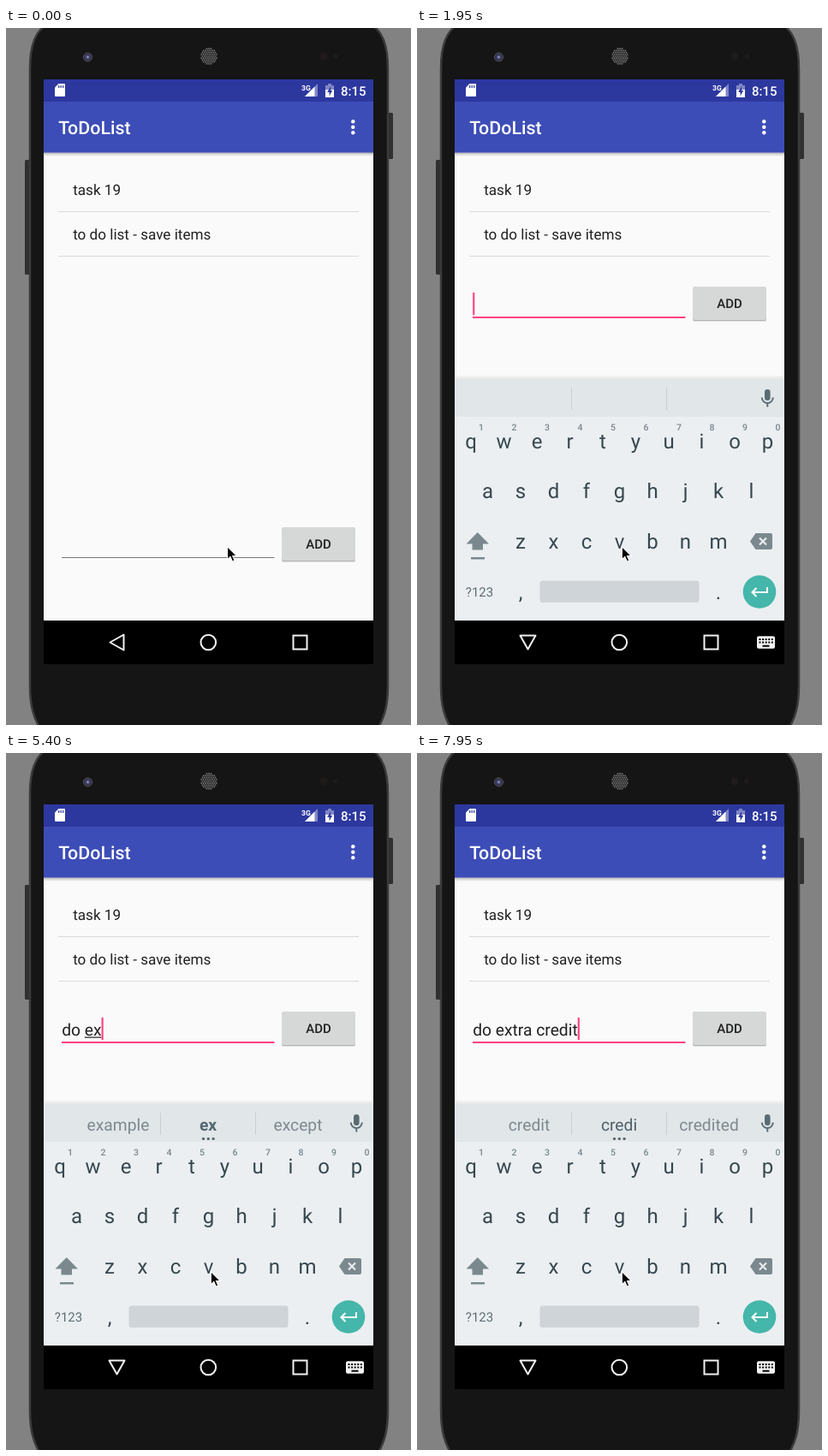
These frames come from a looping animation (473x814 px, 8000 ms). An HTML page:

```html
<!DOCTYPE html>
<html lang="en">
<head>
<meta charset="utf-8">
<title>To-do list demo</title>
<style>
  html, body { margin: 0; width: 100%; height: 100%; overflow: hidden; background: #828282; }
  svg { display: block; width: 473px; height: 814px; }
  text { font-family: Roboto, sans-serif; white-space: pre; text-rendering: geometricPrecision; }
  .medium { font-weight: 500; }
  .mid { text-anchor: middle; }
  .item { font-size: 17.1px; fill: #212121; }
  .letter { font-size: 24px; fill: #37474f; }
  .digit { font-size: 10.5px; font-weight: 500; fill: #78868d; }
  .word { font-size: 19.25px; fill: #7d898f; }
  .outline { fill: none; stroke: #f2f2f2; stroke-width: 2; }
</style>
</head>
<body>
<svg viewBox="0 0 473 814">
  <defs>
    <clipPath id="app"><rect x="44" y="86" width="385" height="606"/></clipPath>
    <linearGradient id="shade" x2="0" y2="1">
      <stop stop-color="#000" stop-opacity=".28"/><stop offset="1" stop-color="#000" stop-opacity="0"/>
    </linearGradient>
    <radialGradient id="lens">
      <stop stop-color="#b9b9e0"/><stop offset=".35" stop-color="#4a4a78"/><stop offset="1" stop-color="#20202c"/>
    </radialGradient>
  </defs>

  <!-- Phone body -->
  <rect width="473" height="814" fill="#828282"/>
  <rect x="22" y="154" width="6" height="134" rx="1.5" fill="#303030"/>
  <rect x="446" y="99" width="6" height="54" rx="1.5" fill="#303030"/>
  <path d="M50 -6C34 3 28 20 28 48V768C28 792 32 806 42 822H432C442 806 446 792 446 768V48C446 20 440 3 424 -6Z"
        fill="#151515" stroke="#3b3b3b" stroke-width="2.5"/>
  <circle cx="95.5" cy="34" r="5" fill="url(#lens)" stroke="#55555c"/>
  <g id="speaker"><circle cx="237" cy="33" r="10" fill="#242424"/></g>
  <circle cx="371" cy="33" r="4.5" fill="#1f1b1b"/>
  <circle cx="385" cy="33" r="2.8" fill="#1f1b1b"/>

  <!-- Screen -->
  <rect x="44" y="60" width="385" height="683" fill="#fafafa"/>
  <rect x="44" y="145" width="385" height="5" fill="url(#shade)"/>
  <rect x="44" y="60" width="385" height="26" fill="#2d389f"/>
  <rect x="44" y="86" width="385" height="59.5" fill="#3d4db7"/>
  <path d="M61.5 65H68Q69 65 69 66V79Q69 80 68 80H58Q57 80 57 79V69.5Z" fill="#fff"/>
  <path d="M61.7 67V70M64.2 67V70M66.7 67V70" stroke="#2d389f" stroke-width="1.2"/>
  <path d="M364 65V80H349Z" fill="#fff" opacity=".4"/>
  <path d="M360.5 68.5V80H349Z" fill="#fff"/>
  <text x="345" y="72.5" font-size="8.5" font-weight="700" fill="#fff">3G</text>
  <path d="M376 65H380V67H383V81H373V67H376Z" fill="#fff" opacity=".4"/>
  <path d="M373 72H383V81H373Z" fill="#fff"/>
  <path d="M379.2 68L375.2 75H377.6V79.5L381.2 73H379.2Z" fill="#2d389f"/>
  <text class="medium" x="391" y="78.7" font-size="15" fill="#fff">8:15</text>
  <text class="medium" x="61.3" y="124" font-size="21.4" fill="#fff">ToDoList</text>
  <g fill="#fff">
    <circle cx="405.3" cy="109.3" r="2.2"/><circle cx="405.3" cy="115.8" r="2.2"/><circle cx="405.3" cy="122.3" r="2.2"/>
  </g>
  <text class="item" x="78.2" y="194.5">task 19</text>
  <text class="item" x="78.2" y="247">to do list - save items</text>
  <path d="M61 214.5H412M61 266.5H412" stroke="#dadada"/>

  <!-- Entry row, placed as it stands above the keyboard -->
  <g id="entry">
    <rect x="322" y="304" width="86" height="39" rx="2" fill="#000" opacity=".1"/>
    <rect x="322" y="303" width="86" height="39" rx="2" fill="#000" opacity=".2"/>
    <rect x="322" y="302" width="86" height="39" rx="2" fill="#d6d7d7"/>
    <text class="medium mid" x="365" y="327" font-size="15" fill="#212121">ADD</text>
    <path id="line" d="M65 337.5H313.5"/>
    <text id="typed" x="65.2" y="330" font-size="19.25" fill="#212121"></text>
    <rect id="underline" y="331.5" height="1.2" fill="#212121"/>
    <rect id="caret" y="309" width="2.1" height="26" fill="#ff4081"/>
  </g>

  <!-- Keyboard -->
  <g clip-path="url(#app)">
    <g id="keyboard">
      <rect x="44" y="406" width="385" height="4" fill="#000" opacity=".03"/>
      <rect x="44" y="408" width="385" height="2" fill="#000" opacity=".04"/>
      <rect x="44" y="410" width="385" height="44" fill="#e1e6e9"/>
      <rect x="44" y="454" width="385" height="262" fill="#ebeff2"/>
      <path d="M180.5 420V446M291.5 420V446" stroke="#c8cfd3"/>
      <rect x="406" y="422" width="6.6" height="13" rx="3.3" fill="#5b6b73"/>
      <path d="M402.8 431.5A6.5 6.5 0 0 0 415.8 431.5M409.3 438V442.5" fill="none" stroke="#5b6b73" stroke-width="2"/>
      <g id="words">
        <text class="word mid" x="131" y="441"></text>
        <text class="word mid" x="236" y="441"></text>
        <text class="word mid" x="341" y="441"></text>
      </g>
      <g id="dots" fill="#4a5a62">
        <circle cx="230.5" cy="450.5" r="1.6"/><circle cx="236.3" cy="450.5" r="1.6"/><circle cx="242.1" cy="450.5" r="1.6"/>
      </g>
      <g id="keys"></g>
      <path d="M70.8 589L84 602.5H77V609.5H64.5V602.5H57.5ZM63 618H79V620.5H63Z" fill="#7b898f"/>
      <path d="M389 599.5L395.5 590H413Q415 590 415 592V607Q415 609 413 609H395.5Z" fill="#7b898f"/>
      <path d="M400 595.5L408 603.5M408 595.5L400 603.5" stroke="#ebeff2" stroke-width="2"/>
      <text class="mid" x="73" y="664" font-size="15" fill="#5f6d75">?123</text>
      <rect x="143.5" y="645.5" width="186" height="25.5" rx="3" fill="#cfd4d8"/>
      <circle cx="400" cy="658.5" r="19.3" fill="#45b6aa"/>
      <path d="M409 653V659H392M396.5 654L391.5 659L396.5 664" fill="none" stroke="#fff" stroke-width="2"/>
    </g>
  </g>

  <!-- Navigation bar -->
  <rect x="44" y="692" width="385" height="51" fill="#000"/>
  <path id="back" class="outline" stroke-linejoin="round"/>
  <circle class="outline" cx="236.3" cy="717.5" r="8.8"/>
  <rect class="outline" x="335.5" y="709.5" width="16" height="16"/>
  <g id="imeIcon">
    <rect x="397" y="710.3" width="21" height="14.5" rx="2" fill="#f2f2f2"/>
    <path d="M399.5 714H416M399.5 717.6H416" stroke="#000" stroke-width="2" stroke-dasharray="2 1.6"/>
    <path d="M403.5 721.7H411.5" stroke="#000" stroke-width="2"/>
  </g>

  <path id="cursor" d="M0 0V15.3L3.5 12L6 17.6L8.6 16.5L6.2 11H11Z" fill="#000" stroke="#fff" stroke-width="1.1"/>
</svg>
<script>
const $ = id => document.getElementById(id);
const label = (cls, x, y, s) => `<text class="${cls} mid" x="${x}" y="${y}">${s}</text>`;

// Hexagonal speaker mesh
let mesh = "";
for (let row = -4; row <= 4; row++)
  for (let col = -5; col <= 5; col++) {
    const x = (col + (row & 1) / 2) * 2.5, y = row * 2.2;
    if (Math.hypot(x, y) < 9.3) mesh += `<circle cx="${237 + x}" cy="${33 + y}" r=".85" fill="#777"/>`;
  }
$("speaker").innerHTML += mesh;

const pitch = 38.5;
const keyRow = (chars, x, y, cls = "letter") =>
  [...chars].map((c, i) => label(cls, x + i * pitch, y, c)).join("");
$("keys").innerHTML =
  keyRow("qwertyuiop", 63, 491) + keyRow("1234567890", 75, 470, "digit") +
  keyRow("asdfghjkl", 82.5, 549) + keyRow("zxcvbnm", 121, 608) +
  label("letter", 121, 667, ",") + label("letter", 352, 667, ".");

// Each step changes some of the state from its time (ms) onwards
const steps = [
  [0, { cursor: 258.5, text: "", words: "", caret: false, focus: false, lifted: false, slide: 1, mark: false, bold: false }],
  [1050, { cursor: 253 }],
  [1200, { cursor: 244 }],
  [1350, { cursor: 239.3 }],
  [1650, { focus: true, caret: true }],
  [1800, { lifted: true, slide: 0.35 }],
  [1950, { slide: 0 }],
  [2250, { caret: false }],
  [2700, { caret: true }],
  [3150, { caret: false }],
  [3750, { caret: true }],
  [4200, { text: "d" }],
  [4350, { text: "do" }],
  [4500, { text: "do " }],
  [4950, { text: "do e" }],
  [5250, { text: "do ex" }],
  [5400, { words: "example ex except", mark: true, bold: true }],
  [5550, { text: "do ext", mark: false }],
  [5700, { text: "do extr", words: "extra ext extension" }],
  [5850, { text: "do extra", words: "extra extr extremely", bold: false }],
  [6000, { words: "extra extra extras", mark: true }],
  [6150, { text: "do extra ", words: "", mark: false }],
  [6450, { caret: false }],
  [7050, { text: "do extra c", caret: true }],
  [7200, { words: "can c could" }],
  [7350, { text: "do extra cr" }],
  [7500, { text: "do extra cre", words: "create cr credit" }],
  [7650, { text: "do extra cred", words: "credit cre create" }],
  [7800, { text: "do extra credi", words: "credit cred credits" }],
  [7950, { text: "do extra credit", words: "credit credi credited" }],
];

const show = (el, on) => el.setAttribute("visibility", on ? "visible" : "hidden");
const set = (el, attrs) => { for (const k in attrs) el.setAttribute(k, attrs[k]); };
const measure = s => {
  $("typed").textContent = s;
  return s ? $("typed").getComputedTextLength() : 0;
};

function draw(t) {
  const s = Object.assign({}, ...steps.filter(([at]) => at <= t).map(([, change]) => change));
  const left = 65.2;
  const wordStart = measure(s.text.slice(0, s.text.lastIndexOf(" ") + 1));
  const end = measure(s.text);

  set($("cursor"), { transform: `translate(${s.cursor} 605.5)` });
  set($("entry"), { transform: `translate(0 ${s.lifted ? 0 : 281})` });
  set($("line"), s.focus ? { stroke: "#ff4081", "stroke-width": 2, transform: "translate(0 .5)" }
                         : { stroke: "#777", "stroke-width": 1, transform: "" });
  set($("caret"), { x: left + end });
  show($("caret"), s.caret);
  set($("underline"), { x: left + wordStart, width: end - wordStart });
  show($("underline"), s.mark);

  set($("keyboard"), { transform: `translate(0 ${s.slide * 70})`, opacity: 1 - s.slide });
  const words = s.words.split(" ");
  [...$("words").children].forEach((el, i) => { el.textContent = words[i] || ""; });
  $("words").children[1].style.cssText = s.bold ? "fill:#566870;font-weight:700" : "fill:#4f5f67";
  show($("dots"), s.words);

  set($("back"), { d: s.lifted ? "M120.5 709.5H138.5L129.5 725.5Z" : "M137.5 708.5V726.5L121.5 717.5Z" });
  show($("imeIcon"), s.lifted);
}

function tick() {
  draw(performance.now() % 8000);
  requestAnimationFrame(tick);
}
tick();
</script>
</body>
</html>
```
